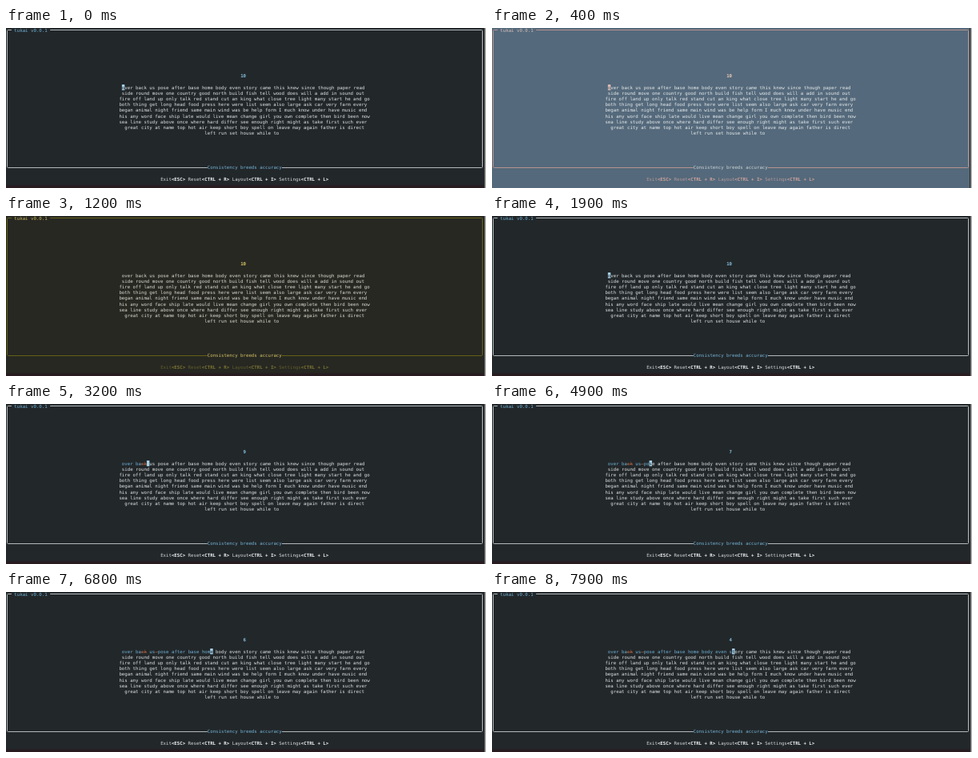
Animation of 600x201 px, one loop 8 s. Source, as an HTML page:

```html
<!DOCTYPE html>
<html lang="en">
<head>
<meta charset="utf-8">
<title>Typing test</title>
<style>
  html, body { margin: 0; width: 100%; height: 100%; overflow: hidden; background: #22272a; }
  svg { display: block; width: 600px; height: 201px; }
  text {
    font: 5.729px "DejaVu Sans Mono", "Liberation Mono", monospace;
    text-rendering: geometricPrecision;
    white-space: pre;
    fill: var(--text);
  }
  .bold { font-weight: bold; }
  .bg { fill: var(--bg); }
  .floor { fill: var(--floor); }
  .frame { fill: none; stroke: var(--line); }
  .title { fill: var(--title); }
  .motto { fill: var(--motto); }
  .timer { fill: var(--timer); font-weight: bold; }
  .help { fill: var(--help); }
  .help .bold { fill: var(--keys); }
  .cursor { fill: var(--cursor); }
  .done { fill: var(--title); }
  .wrong { fill: #b9643f; text-decoration: line-through; }
  .under { fill: var(--under); }

  .night {
    --bg: #22272a; --floor: #281c20; --text: #dfe2e3; --line: #b4babc; --title: #6fb0d2;
    --motto: #74b5d6; --timer: #86c0de; --help: #d8dbdc; --keys: #f2f4f4;
    --cursor: #a6d0e8; --under: #22272a;
  }
  .slate {
    --bg: #54697b; --floor: #54697b; --text: #e6eaec; --line: #b8938f; --title: #d3bdb9;
    --motto: #ccd2d5; --timer: #ecc9ba; --help: #b3989a; --keys: #cda39d;
    --cursor: #dcbab4; --under: #54697b;
  }
  .olive {
    --bg: #272822; --floor: #281c20; --text: #dddcd2; --line: #656018; --title: #c9b65c;
    --motto: #d4c266; --timer: #dcc765; --help: #625d2c; --keys: #7c7433;
    --cursor: #272822; --under: #dddcd2;
  }
</style>
</head>
<body>
<svg id="stage" class="night" viewBox="0 0 600 201"></svg>
<script>
const LOOP = 8000, CELL_W = 3.449, CELL_H = 7.17, COLS = 173;
const stage = document.getElementById("stage");

const words = [
  "over back us pose after base home body even story came this knew since though paper read",
  "side round move one country good north build fish tell wood does will a add in sound out",
  "fire off land up only talk red stand cut an king what close tree light many start he and go",
  "both thing get long head food press here were list seem also large ask car very farm every",
  "began animal night friend same main wind was be help form I much know under have music end",
  "his any word face ship late would live mean change girl you own complete then bird been now",
  "sea line study above once where hard differ see enough right might as take first such ever",
  "great city at name top hot air keep short boy spell on leave may again father is direct",
  "left run set house while to "
];
const help = [["Exit", "<ESC>"], [" Reset", "<CTRL + R>"],
  [" Layout", "<CTRL + I>"], [" Settings", "<CTRL + L>"]];

// [time, value]: each value holds until the next entry
const themes = [[0, "night"], [400, "slate"], [1200, "olive"], [1800, "night"]];
const moves = [[0, 0], [3200, 9], [3500, 10], [3600, 11], [3800, 12], [4000, 13],
  [4400, 15], [4600, 13]];
// [first key, last key, cursor after the first key], one key per 100 ms
const runs = [[2500, 3100, 1], [4800, 5400, 14], [5600, 6300, 21], [6500, 7300, 29],
  [7400, 7600, 39], [7700, 7900, 43]];
for (const [from, to, first] of runs)
  for (let t = from; t <= to; t += 100) moves.push([t, first + (t - from) / 100]);
moves.sort((a, b) => a[0] - b[0]);

const typos = new Set([7, 8, 12]);

const held = (steps, t) => {
  let value = steps[0][1];
  for (const [at, v] of steps) if (at <= t) value = v;
  return value;
};
const centre = s => Math.floor((COLS - s.length) / 2);
const x = col => col * CELL_W;

function add(tag, attrs, text = "", parent = stage) {
  const node = document.createElementNS("http://www.w3.org/2000/svg", tag);
  for (const key in attrs) node.setAttribute(key, attrs[key]);
  node.textContent = text;
  return parent.appendChild(node);
}
const write = (row, col, text, cls = "") =>
  add("text", { x: x(col), y: row * CELL_H + 5.1, class: cls }, text);

// Window, its edges, and the frame, open where the two titles sit
add("rect", { class: "bg", width: 600, height: 201 });
add("rect", { class: "floor", y: 197.5, width: 600, height: 3.5 });
add("rect", { x: 597, width: 1.5, height: 201, fill: "#26282a" });
add("rect", { x: 598.5, width: 1.5, height: 201, fill: "#b8b8b4" });

const left = 1.5, right = 595.5, upper = 2.5, lower = 175.5;
const motto = "Consistency breeds accuracy";
const mottoCol = centre(motto);
add("path", {
  class: "frame",
  d: `M${x(2)} ${upper}H${left + 1}q-1 0-1 1V${lower - 1}q0 1 1 1H${x(mottoCol)}` +
     `M${x(mottoCol + motto.length)} ${lower}H${right - 1}q1 0 1-1V${upper + 1}q0-1-1-1H${x(16)}`
});
write(0, 3, "tukai v0.0.1", "title");
write(24, mottoCol, motto, "motto");

const helpRow = write(26, centre(help.flat().join("")), "", "help");
for (const [name, keys] of help) {
  add("tspan", {}, name, helpRow);
  add("tspan", { class: "bold" }, keys, helpRow);
}

const timer = write(8, 85, "10", "timer");
const cursor = add("rect", { class: "cursor", y: 10 * CELL_H - .7, width: CELL_W, height: CELL_H });
const start = centre(words[0]);
const chars = [...words[0]].map((c, i) => write(10, start + i, c));
words.slice(1).forEach((line, i) => write(11 + i, centre(line), line));

function draw(t) {
  const at = held(moves, t);
  const seconds = t < 2900 ? 10 : 9 - Math.floor((t - 2900) / 1000);
  stage.setAttribute("class", held(themes, t));
  timer.textContent = seconds;
  timer.setAttribute("x", x(seconds > 9 ? 85 : 86));
  cursor.setAttribute("x", x(start + at));
  chars.forEach((node, i) => node.setAttribute("class",
    i > at ? "" : i === at ? "under" : typos.has(i) ? "wrong" : "done"));
}

const began = performance.now();
function tick() {
  draw((performance.now() - began) % LOOP);
  requestAnimationFrame(tick);
}
draw(0);
requestAnimationFrame(tick);
</script>
</body>
</html>
```
